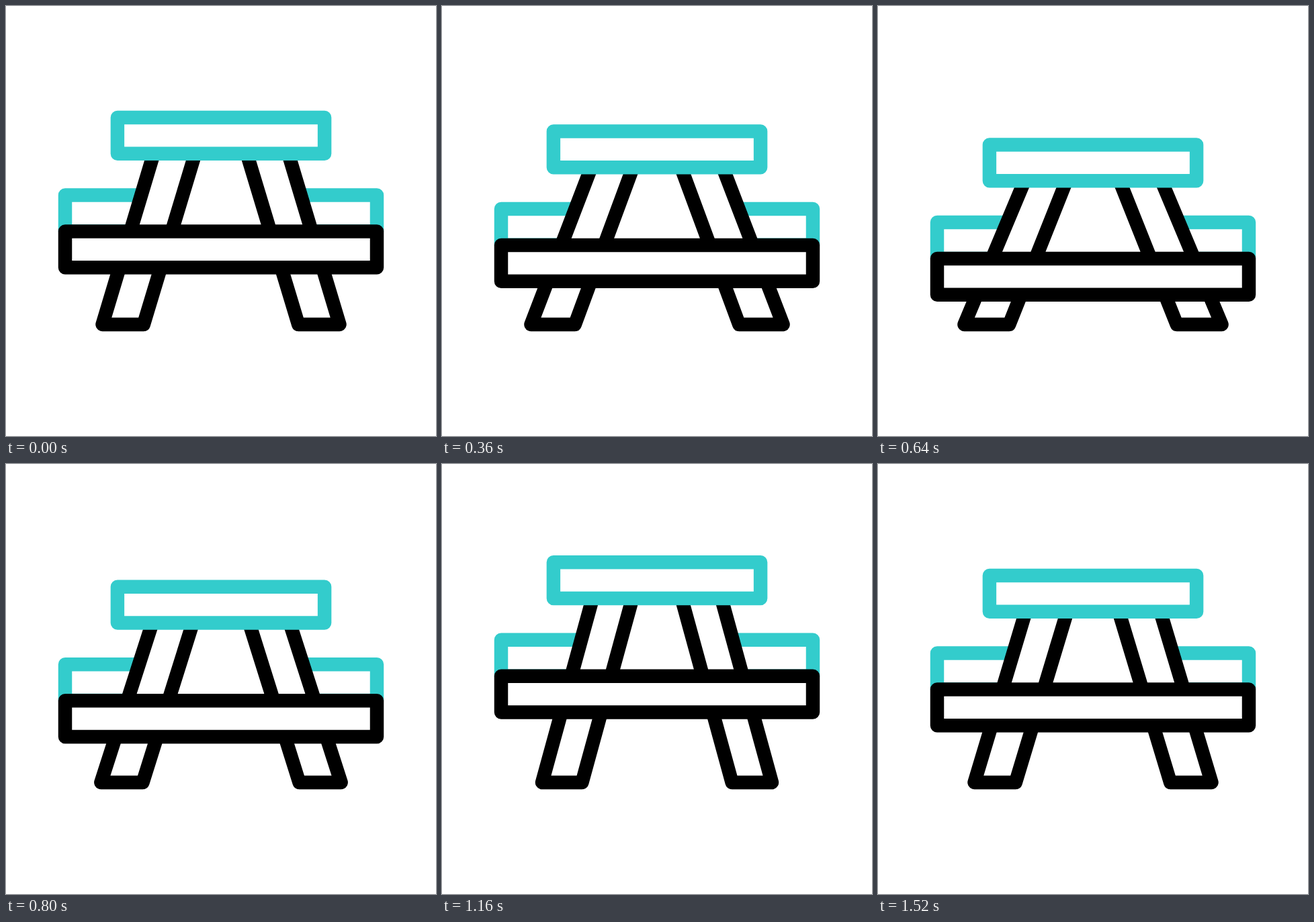
An HTML page for the animation above (1760 ms loop, 640 px wide and 640 px high).

```html
<!DOCTYPE html>
<html lang="en">
<head>
<meta charset="utf-8">
<title>Picnic table</title>
<style>
  html, body { margin: 0; width: 100%; height: 100%; overflow: hidden; background: #fff; }
  svg { display: block; width: 100vw; height: 100vh; }
  .line { fill: #fff; stroke: #000; stroke-width: 20.48; stroke-linejoin: round; }
  .teal { stroke: #33cccc; }
</style>
</head>
<body>
<svg viewBox="0 0 640 640">
  <g class="board"><rect class="line teal" x="88" y="281.5" width="464" height="53.8"/></g>
  <path id="gap" fill="#fff"/>
  <path id="left" class="line"/>
  <path id="right" class="line"/>
  <g class="board">
    <rect class="line" x="88" y="335.4" width="464" height="53.8"/>
    <rect class="line teal" x="165.9" y="165.9" width="308.2" height="53.8"/>
  </g>
</svg>
<script>
const LOOP = 1760, STEP = 40, LEAD = 40, FLOOR = 474;
const TIMES = [120, 600, 1040, 1520];

// One value per pose: rest, squashed, stretched, rest
const DROP = [0, 41.1, -21.4, 0];
const LEG = {
  outTop: [222.75, 222.8, 227, 222.75],
  inTop: [284.5, 285, 285.8, 284.5],
  outFoot: [143.5, 127.6, 150.1, 143.5],
  inFoot: [204.8, 194.7, 209.1, 204.8]
};

const boards = document.querySelectorAll('.board');
const [gap, left, right] = ['gap', 'left', 'right'].map(id => document.getElementById(id));

// cubic-bezier(.6, 0, .4, 1)
function ease(x) {
  let lo = 0, hi = 1;
  for (let i = 0; i < 24; i++) {
    const s = (lo + hi) / 2, r = 1 - s;
    if (1.8 * s * r * r + 1.2 * s * s * r + s * s * s < x) lo = s; else hi = s;
  }
  return lo * lo * (3 - 2 * lo);
}

function at(values, t) {
  if (t <= TIMES[0]) return values[0];
  if (t >= TIMES[3]) return values[3];
  const i = t < TIMES[1] ? 0 : t < TIMES[2] ? 1 : 2;
  const p = ease((t - TIMES[i]) / (TIMES[i + 1] - TIMES[i]));
  return values[i] + (values[i + 1] - values[i]) * p;
}

const path = points => 'M' + points.map(p => p.map(n => n.toFixed(2)).join()).join('L');
const mirror = points => points.map(([x, y]) => [640 - x, y]);

function draw(t) {
  const drop = at(DROP, t);
  boards.forEach(b => b.setAttribute('transform', `translate(0 ${drop.toFixed(2)})`));

  // The legs run slightly ahead of the boards
  const u = t + LEAD, top = 210 + at(DROP, u);
  const leg = [
    [at(LEG.outTop, u), top],
    [at(LEG.outFoot, u), FLOOR],
    [at(LEG.inFoot, u), FLOOR],
    [at(LEG.inTop, u), top]
  ];
  const twin = mirror(leg);
  left.setAttribute('d', path(leg));
  right.setAttribute('d', path(twin));
  gap.setAttribute('d', path([leg[0], leg[1], twin[1], twin[0]]));
}

function tick() {
  const t = (performance.now() + 1) % LOOP;
  draw(Math.floor(t / STEP) * STEP);
  requestAnimationFrame(tick);
}
draw(0);
requestAnimationFrame(tick);
</script>
</body>
</html>
```
